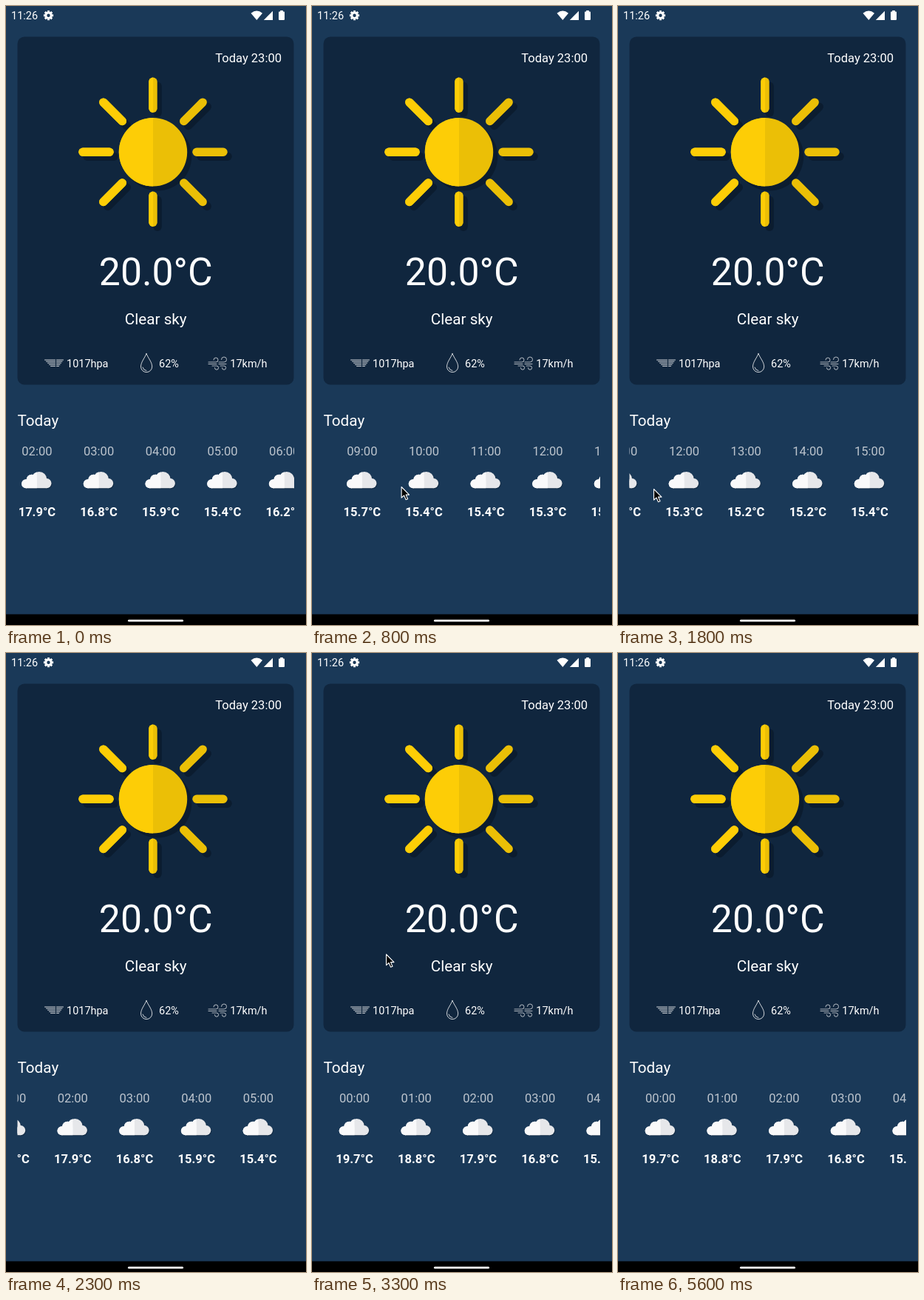
These frames come from a looping animation (406 by 836 pixels, 5.7 s). An HTML page:

```html
<!DOCTYPE html>
<html lang="en">
<head>
<meta charset="utf-8">
<title>Weather</title>
<style>
  html, body { margin: 0; width: 100%; height: 100%; overflow: hidden; background: #1a3958; }
  svg { display: block; width: 406px; height: 836px; }
  text { font-family: Roboto, Arial, sans-serif; font-size: 16.54px; fill: #fff; }
  .huge { font-size: 51.7px; }
  .big { font-size: 20.68px; }
  .small { font-size: 14.48px; }
  .mid { text-anchor: middle; }
  .hour { fill: #bcc4cd; }
  .temp { font-weight: 700; }
  .line { fill: none; stroke: #fff; stroke-width: .8; stroke-linecap: round; }
</style>
</head>
<body>
<svg viewBox="0 0 406 836">
  <defs>
    <g id="sunShape">
      <circle r="46.2"/>
      <g id="rays" stroke="currentColor" stroke-width="11.4" stroke-linecap="round"/>
    </g>
    <g id="cloudShape">
      <circle cx="-14.8" cy="645.2" r="6"/>
      <circle cx="-7" cy="640" r="7.3"/>
      <circle cx="3" cy="639.5" r="10.5"/>
      <circle cx="13" cy="644.6" r="6.6"/>
      <rect x="-15" y="641" width="28" height="10.2"/>
    </g>
    <clipPath id="leftHalf"><rect x="-110" y="-110" width="110" height="220"/></clipPath>
    <clipPath id="cloudLeft"><rect x="-30" y="620" width="30" height="40"/></clipPath>
    <clipPath id="listBox"><rect x="15.5" y="580" width="374.5" height="125"/></clipPath>
    <g id="cloud">
      <use href="#cloudShape" x="1" y="1" fill="#0b1a2b" opacity=".4"/>
      <use href="#cloudShape" fill="#e6e7ea"/>
      <g clip-path="url(#cloudLeft)"><use href="#cloudShape" fill="#f9f9fa"/></g>
    </g>
  </defs>

  <rect width="406" height="836" fill="#1a3958"/>

  <!-- status bar -->
  <text class="small" x="7" y="18">11:26</text>
  <g transform="translate(57.5 12.7)">
    <g id="teeth" fill="#fff"/>
    <circle r="3.6" fill="none" stroke="#fff" stroke-width="2.8"/>
  </g>
  <path d="M331.5 9.7Q339.3 3.2 347 9.7L339.3 19Z" fill="#fff"/>
  <path d="M361 6.8V19H348.8Z" fill="#fff"/>
  <path d="M371.2 7.4V6h3.6v1.4h1.2q1 0 1 1V18q0 1-1 1h-6q-1 0-1-1V8.4q0-1 1-1Z" fill="#fff"/>

  <!-- current weather -->
  <rect x="15.5" y="41.5" width="374" height="470" rx="9.5" fill="#10263e"/>
  <text x="373" y="76" text-anchor="end">Today 23:00</text>
  <g transform="translate(199 197.3)">
    <use href="#sunShape" x="6" y="6" fill="#0b1c2f" color="#0b1c2f"/>
    <use href="#sunShape" fill="#ebbf06" color="#ebbf06"/>
    <g clip-path="url(#leftHalf)"><use href="#sunShape" fill="#fdcd06" color="#fdcd06"/></g>
  </g>
  <text class="huge mid" x="202.7" y="377">20.0°C</text>
  <text class="big mid" x="202.7" y="430">Clear sky</text>

  <g id="haze" class="line"/>
  <text class="small" x="82" y="488">1017hpa</text>
  <path class="line" d="M190 469.5C188 475 182.5 481 182.5 487A7.6 7.6 0 0 0 197.7 487C197.7 481 192 475 190 469.5ZM185 488q1 4 5 4.5"/>
  <text class="small" x="207" y="488">62%</text>
  <path class="line" opacity=".85" d="M274 481H284a3 3 0 1 0-3-3M288 481H295a3.5 3.5 0 1 0-3.5-3.5M274 483.5H285M288 483.5H298M279 486H285a2.6 2.6 0 1 1-2.6 2.6M290 486H295a2.6 2.6 0 1 1-2.6 2.6"/>
  <text class="small" x="303.3" y="488">17km/h</text>

  <!-- hourly list -->
  <text class="big" x="15.5" y="567">Today</text>
  <g clip-path="url(#listBox)"><g id="list"></g></g>

  <rect y="821.5" width="406" height="14.5" fill="#000"/>
  <rect x="165" y="828.8" width="75" height="2.8" rx="1.4" fill="#fff"/>

  <path id="cursor" d="M.5 .5V15.2L4 12 6.5 17.8 9 16.7 6.5 11.1H11Z" fill="#000" stroke="#fff" stroke-width="1.1" stroke-linejoin="round"/>
</svg>
<script>
const LOOP = 5700, STEP = 100, PITCH = 83.7;
const byId = id => document.getElementById(id);
const repeat = (n, draw) => Array.from({ length: n }, (_, i) => draw(i)).join("");

const temps = "19.7 18.8 17.9 16.8 15.9 15.4 16.2 16.5 16.1 15.7 15.4 15.4 15.3 15.2 15.2 15.4".split(" ");

// Smooth 0 to 1 between two times
function ease(t, from, to) {
  const p = Math.min(1, Math.max(0, (t - from) / (to - from)));
  return p * p * (3 - 2 * p);
}

// A decaying fling, a slow drag onwards, then a fast swipe back to the start
function scrollAt(t) {
  const fling = 770 - 587 * Math.exp(-t / 260);
  return (fling + 203 * ease(t, 1200, 1800)) * (1 - ease(t, 1900, 2422));
}

// The pointer drags the list, leaves, then crosses the card
function pointerAt(t) {
  if (t >= 700 && t <= 2250) {
    const swing = ease(t, 650, 1100) - ease(t, 1200, 1800);
    return [48 + 280 * swing + 340 * ease(t, 1900, 2250), 649 + 3 * ease(t, 1200, 1800)];
  }
  if (t >= 2800 && t <= 4300) {
    const come = ease(t, 2800, 3300), go = ease(t, 3600, 4300);
    return [370 - 270 * come + 230 * go, 330 + 76.5 * come - 410 * go];
  }
  return null;
}

byId("rays").innerHTML = repeat(8, i => `<path d="M0-59V-95" transform="rotate(${i * 45})"/>`);
byId("teeth").innerHTML = repeat(8, i =>
  `<rect x="-1.5" y="-6.6" width="3" height="3" rx=".4" transform="rotate(${i * 45})"/>`);
byId("haze").innerHTML = repeat(5, i =>
  `<path d="M${52.5 + 2 * i} ${478 + 2.1 * i}H${77.5 - 1.5 * i}" stroke-dasharray="${14 - 2 * i} 2"/>`);

byId("list").innerHTML = temps.map((deg, h) => `
  <g transform="translate(${57.5 + PITCH * h} 0)">
    <text class="hour mid" y="607">${String(h).padStart(2, "0")}:00</text>
    <use href="#cloud"/>
    <text class="temp mid" y="689">${deg}°C</text>
  </g>`).join("");

const list = byId("list"), cursor = byId("cursor");

function draw(t) {
  list.setAttribute("transform", `translate(${-scrollAt(t)} 0)`);
  const spot = pointerAt(t);
  cursor.style.display = spot ? "" : "none";
  if (spot) cursor.setAttribute("transform", `translate(${spot})`);
}

const start = performance.now();
function tick() {
  const t = (performance.now() - start) % LOOP;
  draw(Math.floor(t / STEP) * STEP);
  requestAnimationFrame(tick);
}
tick();
</script>
</body>
</html>
```
